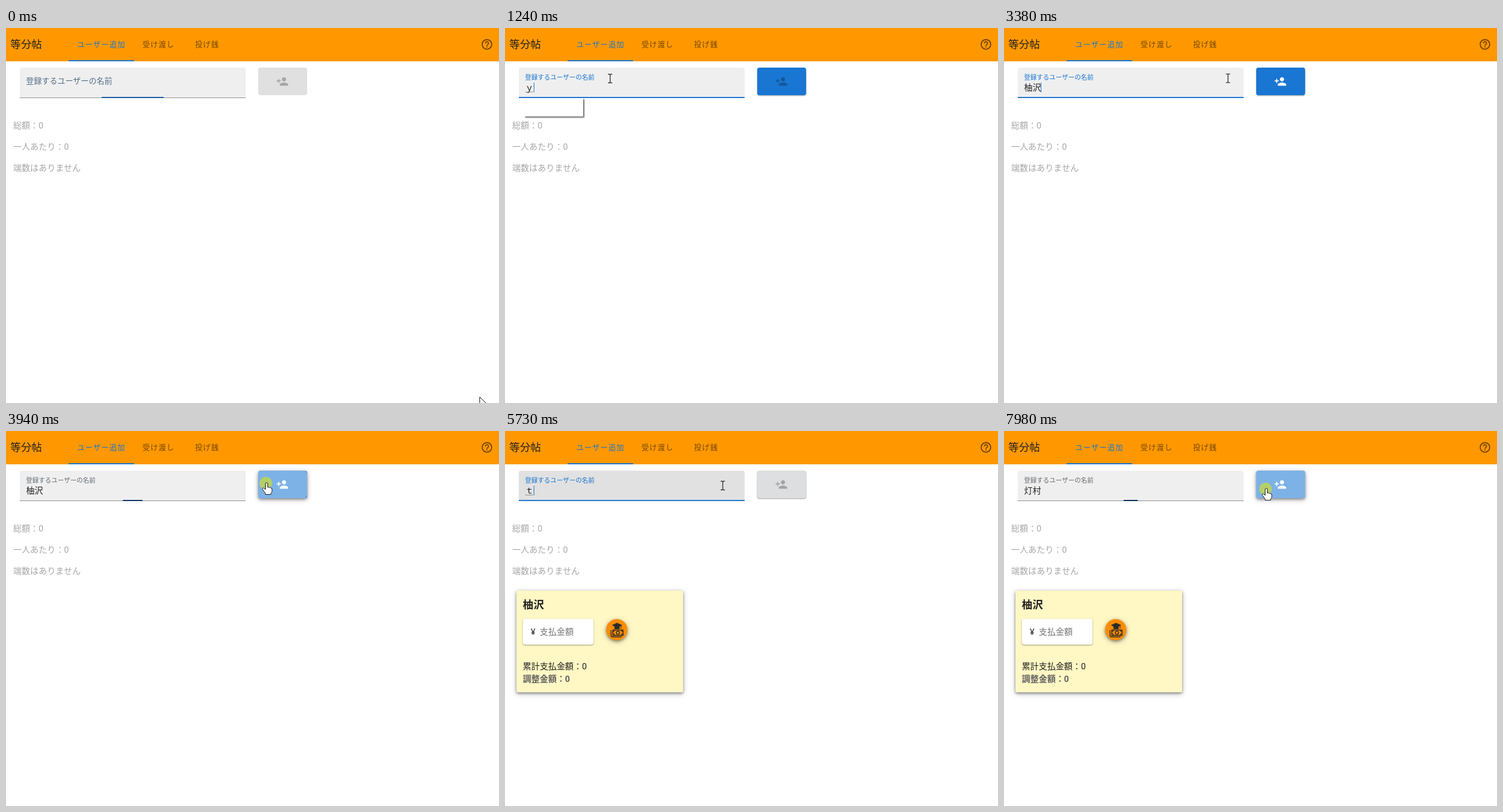
Animation of 858 by 653 pixels, one loop 8000 ms. Source, as an HTML page:

```html
<!DOCTYPE html>
<html lang="ja">
<head>
<meta charset="utf-8">
<style>
html, body { margin: 0; width: 100%; height: 100%; overflow: hidden; background: #fff; }
svg { display: block; }
text { font: 14.72px Roboto, 'Noto Sans CJK JP', sans-serif; fill: #212121; white-space: pre; }
.tab { font-size: 12.9px; letter-spacing: 1.15px; fill: #704600; }
.grey { fill: #a6a6a6; }
.bold { font-weight: 700; }
.raised { filter: drop-shadow(0 2px 2px #0005) drop-shadow(0 2px 4px #0004); }
.low { filter: drop-shadow(0 1px 1px #0006); }
#popup { filter: drop-shadow(2px 2px 1px #0009); }
</style>
</head>
<body>
<svg width="858" height="653" viewBox="0 0 858 653">
  <rect width="858" height="58" fill="#ff9800"/>
  <text x="7.5" y="34.5" style="font-size:18.4px">等分帖</text>
  <text class="tab" x="124" y="33" style="fill:#1976d2">ユーザー追加</text>
  <text class="tab" x="237.5" y="33">受け渡し</text>
  <text class="tab" x="329" y="33">投げ銭</text>
  <rect x="109" y="56" width="114" height="2" fill="#1976d2"/>
  <path transform="translate(826 17.5) scale(.92)" fill="#000" fill-opacity=".56" d="M11 18h2v-2h-2v2zm1-16C6.48 2 2 6.48 2 12s4.48 10 10 10 10-4.48 10-10S17.52 2 12 2zm0 18c-4.41 0-8-3.59-8-8s3.59-8 8-8 8 3.59 8 8-3.59 8-8 8zm0-14c-2.21 0-4 1.79-4 4h2c0-1.1.9-2 2-2s2 .9 2 2c0 2-3 1.75-3 5h2c0-2.25 3-2.5 3-5 0-2.21-1.79-4-4-4z"/>

  <text class="grey" x="12.6" y="175.3">総額：0</text>
  <text class="grey" x="12.6" y="212.3">一人あたり：0</text>
  <text class="grey" x="12.6" y="249.3">端数はありません</text>

  <path id="field" d="M24 122V73q0-4 4-4H413q4 0 4 4v49z"/>
  <rect id="border" x="24" y="121" width="393" height="1"/>
  <rect id="line" y="120" height="2"/>
  <text id="label">登録するユーザーの名前</text>
  <text id="value" x="35" y="108.7"></text>
  <path id="under" stroke="#333"/>
  <rect id="caret" y="95" width="1" height="17" fill="#1976d2"/>
  <g id="popup">
    <rect id="panel" x="33" y="122" width="103" fill="#fff"/>
    <text id="row0" x="41" y="144"></text>
    <text id="row1" x="41" y="165"></text>
  </g>

  <clipPath id="clip"><rect x="439" y="69" width="85" height="48" rx="4"/></clipPath>
  <rect id="button" x="439" y="69" width="85" height="48" rx="4"/>
  <g clip-path="url(#clip)"><circle id="ripple" fill="#fff"/></g>
  <path id="icon" transform="translate(470 82) scale(.92)" d="M15 12c2.21 0 4-1.79 4-4s-1.79-4-4-4-4 1.79-4 4 1.79 4 4 4zm-9-2V7H4v3H1v2h3v3h2v-3h3v-2H6zm9 4c-2.67 0-8 1.34-8 4v2h16v-2c0-2.66-5.33-4-8-4z"/>

  <g id="card">
    <rect class="raised" x="20" y="278" width="290" height="177" rx="2" fill="#fff7c4"/>
    <text class="bold" x="31" y="308.7" style="font-size:18.4px">柚沢</text>
    <rect class="low" x="31" y="327" width="123" height="45" rx="4" fill="#fff"/>
    <text x="45" y="354.5">¥</text>
    <text x="60.5" y="355" style="fill:#757575">支払金額</text>
    <circle class="raised" cx="194.5" cy="346" r="18.5" fill="#fb8c00"/>
    <path d="M186 338l9-4 9 4-1.500 1v5h-1v-4.500l-2 1v4.500h-9v-4.500z" fill="#2b2b2b"/>
    <g fill="none" stroke="#2b2b2b" stroke-width="1.4">
      <path d="M184.500 347v9q0 2.500 2.500 2.500H203M187.500 346.500h18v9.500h-18z"/>
      <circle cx="196.500" cy="351.300" r="2.800"/>
      <path d="M188 350l3-3M205 350l-3-3M188 352.500l3 3M205 352.500l-3 3"/>
    </g>
    <text x="31" y="415">累計支払金額：0</text>
    <text class="bold" x="31" y="437.300" style="fill:#616161">調整金額：0</text>
  </g>

  <circle id="press" r="11" fill="#b5cf68"/>
  <g id="pointer" stroke="#111" fill="#fff" stroke-linejoin="round">
    <path id="arrow" d="M.5.5V17l4-3.500 2.500 6 2.500-1-2.500-6h5.500z"/>
    <path id="beam" fill="none" stroke="#222" stroke-width="1.300" d="M-3.500-7.500h2.500L0-7l1-.5h2.500M0-7V7M-3.500 7.500h2.500L0 7l1 .5h2.500"/>
    <path id="hand" d="M-2 2q0-2 2-2t2 2v6q2-1 3 .5 2-.5 2.500 1 2-.3 2 2v3q0 2-2 4v2H-2v-2l-5-7q-.5-2 1-2.300 1.500 0 4 2.800z"/>
  </g>
</svg>
<script>
const LOOP = 8000, CHAR = 14.72, CLEAR = 4050;
const FOCUS = [590, 4850], CLICKS = [3774, 7800];
const words = [
  { start: 1100, convert: 1970, commit: 2300, end: CLEAR, step: 90, kana: 'ゆずさわ', keys: 'ｙｚｓｗ', kanji: '柚沢', tall: k => k > 2 && k < 6 },
  { start: 5730, convert: 6550, commit: 6680, end: LOOP, step: 84, kana: 'とむら', keys: 'ｔｍｒ', kanji: '灯村', tall: k => k > 1 },
];
const route = [
  [100, 824, 642], [240, 556, 457], [340, 320, 281], [420, 165, 127], [500, 183, 88],
  [2880, 183, 88], [3250, 350, 86], [3590, 453.5, 90], [4150, 453.5, 90], [4420, 414, 93], [4640, 379, 95],
  [7240, 379, 95], [7480, 430, 94], [7680, 456.5, 100],
];

const $ = Object.fromEntries([...document.querySelectorAll('[id]')].map(e => [e.id, e]));
const set = (el, attrs) => { for (const k in attrs) el.setAttribute(k, attrs[k]); };
const show = (el, on) => { el.style.display = on ? '' : 'none'; };
const clamp = p => Math.min(1, Math.max(0, p));
const ease = p => 1 - (1 - clamp(p)) ** 3;
const within = (t, a, b) => t >= a && t < b;
const pulse = (t, on, off, ms = 300) => ease((t - on) / ms) - ease((t - off) / ms);
const mix = (a, b, p) => `rgb(${a.map((v, i) => Math.round(v + (b[i] - v) * p))})`;
const BLUE = [25, 118, 210];

function pointerAt(t) {
  const i = route.findIndex(p => p[0] > t);
  if (i === 0) return route[0].slice(1);
  if (i < 0) return route.at(-1).slice(1);
  const [t0, x0, y0] = route[i - 1], [t1, x1, y1] = route[i], p = (t - t0) / (t1 - t0);
  return [x0 + (x1 - x0) * p, y0 + (y1 - y0) * p];
}

function drawField(t) {
  const closing = 1 - ease((t + 104) / 300);
  const focus = clamp(FOCUS.reduce((sum, on, i) => sum + pulse(t, on, CLICKS[i]), closing));
  const lift = clamp(closing + pulse(t, FOCUS[0], CLEAR) + pulse(t, FOCUS[1], 2 * LOOP));
  const hover = pulse(t, 450, 1100, 120) + pulse(t, 4340, 5730, 120);
  $.field.setAttribute('fill', mix([239, 239, 239], [225, 225, 225], hover));
  $.border.setAttribute('fill', mix([140, 140, 140], [50, 50, 50], hover));
  set($.line, { x: 220.5 - 196.5 * focus, width: 393 * focus, fill: mix([0, 26, 64], BLUE, clamp(focus * 2.5)) });
  $.label.setAttribute('transform', `translate(34.7 ${99.6 - 9.3 * lift}) scale(${1 - lift / 4})`);
  $.label.style.fill = mix([108, 108, 108], BLUE, focus);
}

function drawInput(t) {
  const word = words.find(w => within(t, w.start, w.end));
  let text = '', typing = false, lastInput = FOCUS.findLast(on => on <= t);
  if (word) {
    const k = Math.min(word.kana.length * 2 - 1, Math.max(0, Math.floor((t - word.start - 70) / word.step)));
    typing = t < word.convert;
    text = typing ? word.kana.slice(0, (k + 1) >> 1) + (k % 2 ? '' : word.keys[k >> 1]) : word.kanji;
    lastInput = Math.min(t, word.commit);
    const tall = word.tall(k);
    $.panel.setAttribute('height', tall ? 52 : 32);
    $.row0.textContent = k ? word.kanji : '';
    $.row1.textContent = tall ? word.kana : '';
  }
  const width = text.length * CHAR;
  $.value.textContent = text;
  show($.popup, typing && t > word.start + 80);
  show($.under, word && t < word.commit);
  set($.under, { d: `M35.5 111.5H${34 + width}`, 'stroke-dasharray': typing ? '1 1' : 'none' });
  const focused = FOCUS.some((on, i) => within(t, on, CLICKS[i]));
  show($.caret, focused && Math.floor((t - lastInput) / 530) % 2 === 0);
  $.caret.setAttribute('x', Math.round(35 + width));
}

function drawButton(t, x, y) {
  const over = x >= 439;
  const word = words.find(w => within(t, w.start, w.end));
  const enabled = pulse(t, 1100, CLEAR, 160) + pulse(t, 5730, 2 * LOOP, 160);
  const base = over && word ? [48, 132, 215] : BLUE;
  set($.button, {
    fill: mix([224, 224, 224], base, enabled),
    class: !word ? '' : over ? 'raised' : 'low',
  });
  const bright = word && t > word.start + 200;
  set($.icon, { fill: bright ? '#fff' : '#000', 'fill-opacity': bright ? 1 : .26 });

  const click = CLICKS.find(c => within(t, c, c + 430));
  const p = ease((t - click) / 250);
  show($.ripple, click);
  if (click) set($.ripple, {
    cx: x + (481.5 - x) * p, cy: y + (93 - y) * p, r: 49 * p,
    opacity: .37 * clamp((click + 430 - t) / 150),
  });
  show($.press, CLICKS.some(c => within(t, c - 30, c + 260)));
  set($.press, { cx: x - 1.3, cy: y + .7 });
}

function drawPointer(x, y) {
  const hand = x >= 439 && x < 524 && y < 118;
  const beam = x > 24 && x < 417 && y > 69 && y < 122;
  show($.hand, hand);
  show($.beam, beam);
  show($.arrow, !hand && !beam);
  $.pointer.setAttribute('transform', `translate(${x} ${y})`);
}

function frame() {
  const t = performance.now() % LOOP, [x, y] = pointerAt(t);
  drawField(t);
  drawInput(t);
  drawButton(t, x, y);
  show($.card, t >= CLEAR);
  drawPointer(x, y);
  requestAnimationFrame(frame);
}
frame();
</script>
</body>
</html>
```
